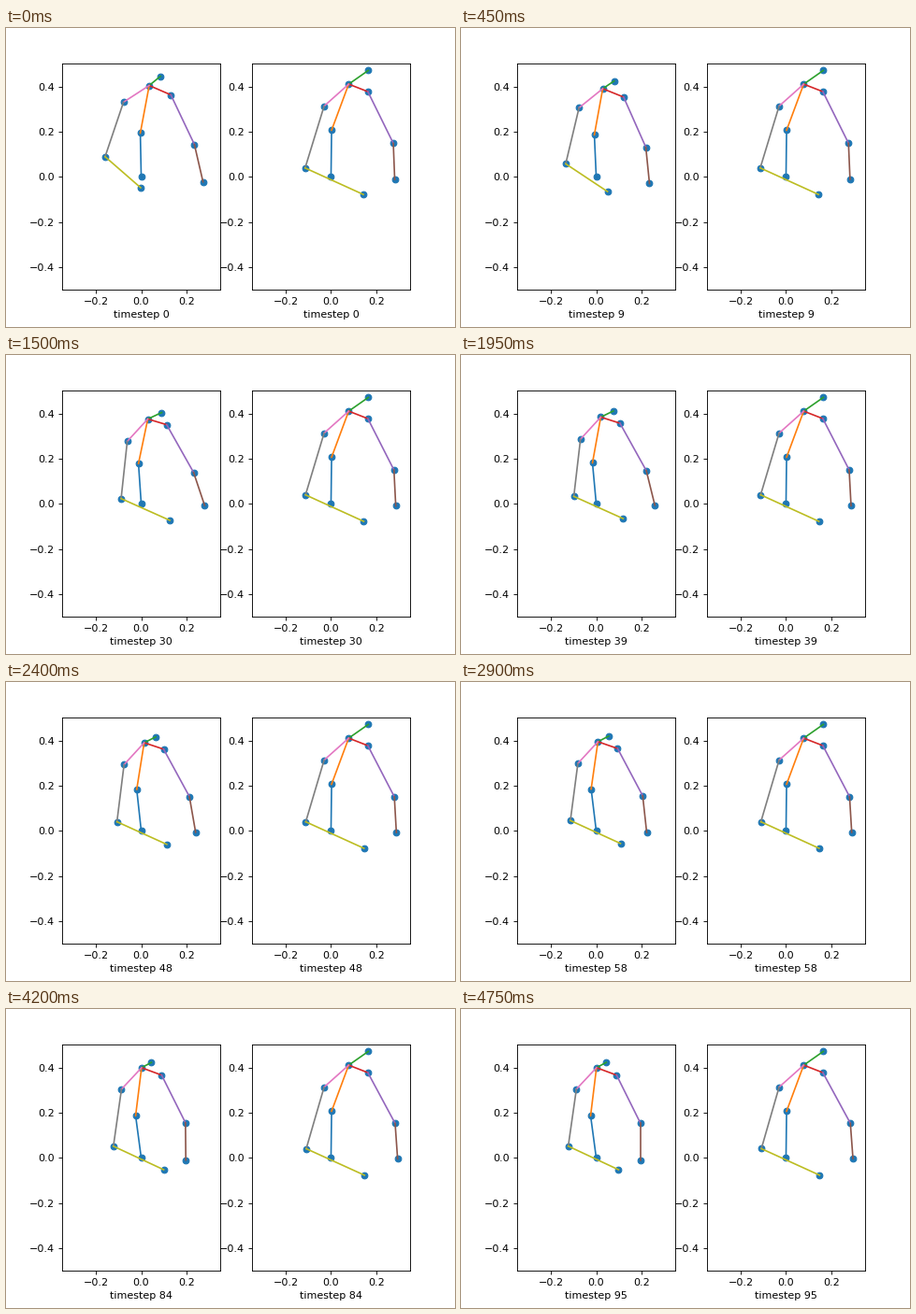
Animation of 480 by 320 pixels, one loop 4800 ms. Source, as a matplotlib script:

```python
import numpy as np
import matplotlib.pyplot as plt
from matplotlib.animation import FuncAnimation

FRAMES = 96
INTERVAL = 50
SCALE = 241.6  # pixels per data unit
DIP, REACHED = 18, 30  # steps when the body is lowest and the arm furthest out

# Parent and child of each bone, in colour-cycle order
BONES = [
    ("hip", "spine"), ("spine", "neck"), ("neck", "head"),
    ("neck", "r_shoulder"), ("r_shoulder", "r_elbow"), ("r_elbow", "r_wrist"),
    ("neck", "l_shoulder"), ("l_shoulder", "l_elbow"), ("l_elbow", "l_wrist"),
]

# Resting bone vectors in pixels, x + yj
LEFT = [-6 + 45j, 6.3 + 51.4j, 10.5 + 5.7j,
        21.5 - 8j, 25.3 - 51j, -40j,
        -21.5 - 23j, -8.7 - 61j, 53.8 - 25.2j]
RIGHT = [0.6 + 49.8j, 18.3 + 49.3j, 21 + 14.7j,
         20.5 - 8j, 27.2 - 55.3j, 1.5 - 38.7j,
         -26.3 - 23.5j, -20.3 - 66.2j, 62.3 - 28.4j]

# Motions stretch and turn (degrees) the bone that ends at each joint
OPENING = {
    "spine": (1.03, -6.4), "neck": (1, -3.6), "head": (1.3, 11),
    "r_shoulder": (1.1, -3), "r_elbow": (1.03, -1), "r_wrist": (1.03, 13),
    "l_shoulder": (1.04, -14), "l_elbow": (1, -10.5), "l_wrist": (0.85, -16),
}
BOW = {
    "spine": (0.95, -3.7), "neck": (0.94, -3), "head": (1.15, 0),
    "r_elbow": (1.03, -4), "r_wrist": (0.93, -1.5),
    "l_shoulder": (1.03, -2), "l_wrist": (0.96, -1),
}
REACH = {
    "neck": (1, -1.8), "head": (1.2, -3.5), "r_shoulder": (0.92, 3.7),
    "r_elbow": (1, 7), "r_wrist": (1, 20),
    "l_shoulder": (1, 2.5), "l_elbow": (1, 2), "l_wrist": (1, 2),
}
DRIFT = {"r_elbow": (1, 2.3), "r_wrist": (0.98, 2), "l_elbow": (0.99, 1)}


def ramp(step, start, end):
    return np.clip((step - start) / (end - start), 0, 1)


def remaining(step):
    """Share of the reach still to be undone on the way back to rest."""
    return 1 - ramp(step, REACHED, FRAMES - 1)


LEFT_MOTIONS = [
    (OPENING, lambda s: 1 - ramp(s, 0, DIP)),
    (BOW, lambda s: ramp(s, 0, DIP) * remaining(s) ** 3),
    (REACH, lambda s: ramp(s, DIP, REACHED) * remaining(s) ** 2),
]
RIGHT_MOTIONS = [(DRIFT, lambda s: ramp(s, 0, FRAMES - 1))]


def pose(rest, motions, step):
    """Joint positions in data units at a time step."""
    joints = {"hip": 0j}
    for (parent, child), bone in zip(BONES, rest):
        for motion, weight in motions:
            stretch, turn = motion.get(child, (1, 0))
            w = weight(step)
            bone *= stretch ** w * np.exp(1j * np.radians(turn * w))
        joints[child] = joints[parent] + bone / SCALE
    return {name: (p.real, p.imag) for name, p in joints.items()}


class Skeleton:
    def __init__(self, ax, rest, motions):
        self.ax, self.rest, self.motions = ax, rest, motions
        ax.set_xlim(-0.35, 0.35)
        ax.set_ylim(-0.5, 0.5)
        self.dots = ax.scatter([], [], color="C0")
        self.lines = [ax.plot([], [], color=f"C{i}")[0] for i in range(len(BONES))]

    def draw(self, step):
        joints = pose(self.rest, self.motions, step)
        self.dots.set_offsets(list(joints.values()))
        for line, (a, b) in zip(self.lines, BONES):
            line.set_data(*zip(joints[a], joints[b]))
        self.ax.set_xlabel(f"timestep {step}")


fig, (left_ax, right_ax) = plt.subplots(1, 2, figsize=(6, 4), dpi=80)
fig.subplots_adjust(bottom=0.125)
skeletons = [Skeleton(left_ax, LEFT, LEFT_MOTIONS),
             Skeleton(right_ax, RIGHT, RIGHT_MOTIONS)]


def update(step):
    for skeleton in skeletons:
        skeleton.draw(step)


anim = FuncAnimation(fig, update, frames=FRAMES, interval=INTERVAL,
                     init_func=lambda: update(0), repeat=True, repeat_delay=0)
plt.show()
```
